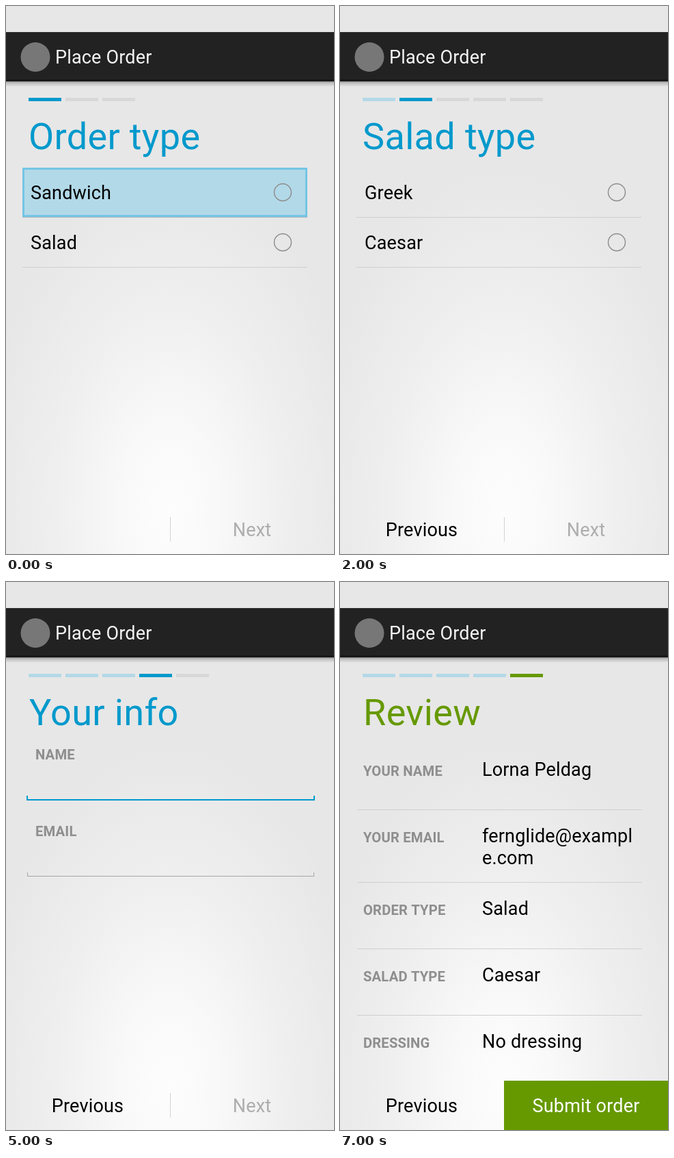
These frames come from a looping animation (480 px wide and 800 px high, 8 s). An HTML page with a canvas:

```html
<!DOCTYPE html>
<html lang="en">
<head>
<meta charset="utf-8">
<title>Place Order</title>
<style>
html, body { margin: 0; width: 100%; height: 100%; overflow: hidden; background: #e7e7e7; }
canvas { display: block; width: 480px; height: 800px; }
</style>
</head>
<body>
<canvas id="stage" width="480" height="800"></canvas>
<script>
const ctx = document.getElementById('stage').getContext('2d');
const BLUE = '#0099cc', GREEN = '#669900', LINE = '#cfcfcf', MUTED = '#adadad';
const STEP_MS = 1000;
const TRACKING = 0.0065; // em
const person = 'Lorna Peldag', mail = 'fernglide@example.com';

// Each scene holds for one second; dx is the residual pager scroll.
const orderType = { title: 'Order type', options: ['Sandwich', 'Salad'], page: 0 };
const saladType = { title: 'Salad type', options: ['Greek', 'Caesar'], page: 1 };
const dressing = {
  title: 'Dressing', page: 2,
  options: ['No dressing', 'Balsamic', 'Oil & vinegar', 'Thousand Island', 'Italian']
};
const scenes = [
  { ...orderType, pages: 3, focus: 0 },
  { ...orderType, picked: 1, next: true },
  { ...saladType },
  { ...saladType, picked: 1, next: true },
  { ...dressing, picked: 0, next: true, dx: 7 },
  { title: 'Your info', page: 3, form: ['', ''], focus: 0, dx: 1 },
  { title: 'Your info', page: 3, form: [person, mail], focus: 1, next: true },
  { title: 'Review', page: 4, review: true, dx: 1 }
];

function rect(x, y, w, h, color) {
  ctx.fillStyle = color;
  ctx.fillRect(x, y, w, h);
}

function text(str, x, y, color = '#000', size = 27, weight = 400, align = 'left') {
  ctx.font = `${weight} ${size}px Roboto, sans-serif`;
  ctx.letterSpacing = `${size * TRACKING}px`;
  ctx.textAlign = align;
  ctx.fillStyle = color;
  ctx.fillText(str, x, y);
}

function label(str, x, y) {
  text(str, x, y, '#8e8e8e', 20.25, 700);
}

function disc(x, y, r, color) {
  ctx.beginPath();
  ctx.arc(x, y, r, 0, Math.PI * 2);
  ctx.fillStyle = color;
  ctx.fill();
}

function backdrop() {
  rect(0, 0, 480, 800, '#e7e7e7');
  ctx.save();
  ctx.translate(240, 735);
  ctx.scale(0.56, 1);
  const glow = ctx.createRadialGradient(0, 0, 0, 0, 0, 500);
  glow.addColorStop(0, '#fdfdfd');
  glow.addColorStop(0.25, '#f9f9f9');
  glow.addColorStop(0.6, '#efefef');
  glow.addColorStop(1, '#e7e7e7');
  ctx.fillStyle = glow;
  ctx.fillRect(-500, -625, 1000, 700);
  ctx.restore();
}

function actionBar() {
  const shadow = ctx.createLinearGradient(0, 110, 0, 118);
  shadow.addColorStop(0, 'rgba(0,0,0,.42)');
  shadow.addColorStop(0.25, 'rgba(0,0,0,.19)');
  shadow.addColorStop(1, 'rgba(0,0,0,0)');
  rect(0, 110, 480, 8, shadow);
  rect(0, 38, 480, 72, '#222');
  rect(0, 38, 480, 1, '#2e2e2e');
  rect(0, 107, 480, 3, '#181818');
  disc(43, 74.5, 21.5, '#777');
  text('Place Order', 72, 84, '#f3f3f3');
}

function steps(count, page, color) {
  for (let i = 0; i < count; i++) {
    rect(33 + 54 * i, 134, 48, 5, i < page ? '#b4d9e7' : i > page ? '#d8d8d8' : color);
  }
}

function radio(x, y, on) {
  if (on) disc(x, y, 12.5, '#d9dcdd');
  ctx.beginPath();
  ctx.arc(x, y, 12.5, 0, Math.PI * 2);
  ctx.lineWidth = 1.4;
  ctx.strokeStyle = on ? '#858585' : '#8c8c8c';
  ctx.stroke();
  if (on) {
    disc(x, y, 8.8, '#a9cbd8');
    disc(x, y, 7.8, '#3d94b4');
    disc(x, y, 6.8, BLUE);
  }
}

function choices({ options, picked, focus }) {
  options.forEach((name, i) => {
    const y = 236 + 73 * i;
    if (i === focus) {
      rect(24, y, 417, 72, '#74c6e5');
      rect(27, y + 3, 411, 66, '#b2d9e8');
    }
    rect(24, y + 72, 417, 1, i === focus ? '#b0b8be' : LINE);
    text(name, 36, y + 46);
    radio(405, y + 36, i === picked);
  });
}

function field(name, value, y, active) {
  const color = active ? BLUE : '#a6a6a6';
  const w = active ? 2 : 1, left = active ? 29 : 30, right = active ? 451 : 450;
  label(name, 42, y + 23);
  text(value, 42, y + 68);
  rect(left, y + 81, right - left, w, color);
  rect(left, y + 76, w, 6, color);
  rect(right - w, y + 76, w, 6, color);
}

function review() {
  const rows = [
    ['YOUR NAME', person], ['YOUR EMAIL', mail.slice(0, 16), mail.slice(16)],
    ['ORDER TYPE', 'Salad'], ['SALAD TYPE', 'Caesar'], ['DRESSING', 'No dressing']
  ];
  let y = 283;
  rows.forEach(([name, ...lines], i) => {
    const gap = lines.length > 1 ? 58 : 49;
    label(name, 33, y);
    lines.forEach((line, n) => text(line, 207, y + 32 * n));
    if (i < rows.length - 1) rect(24, y + gap, 417, 1, LINE);
    y += gap + 48;
  });
}

function buttons(scene) {
  if (scene.page > 0) text('Previous', 119.5, 774, '#000', 27, 400, 'center');
  if (scene.review) {
    rect(240, 728, 240, 72, GREEN);
    text('Submit order', 360, 774, '#fff', 27, 400, 'center');
  } else {
    rect(240, 746, 1, 36, '#d2d2d2');
    text('Next', 360, 774, scene.next ? '#000' : MUTED, 27, 400, 'center');
  }
}

function draw(scene) {
  const accent = scene.review ? GREEN : BLUE;
  backdrop();
  actionBar();
  steps(scene.pages || 5, scene.page, accent);
  ctx.save();
  ctx.translate(scene.dx || 0, 0);
  text(scene.title, 33, 209, accent, 54);
  if (scene.options) choices(scene);
  if (scene.form) {
    ['NAME', 'EMAIL'].forEach((name, i) =>
      field(name, scene.form[i], 236 + 112 * i, i === scene.focus));
  }
  if (scene.review) review();
  ctx.restore();
  buttons(scene);
}

const start = performance.now();
function tick() {
  const t = performance.now() - start;
  draw(scenes[Math.floor(t / STEP_MS) % scenes.length]);
  requestAnimationFrame(tick);
}
tick();
</script>
</body>
</html>
```
